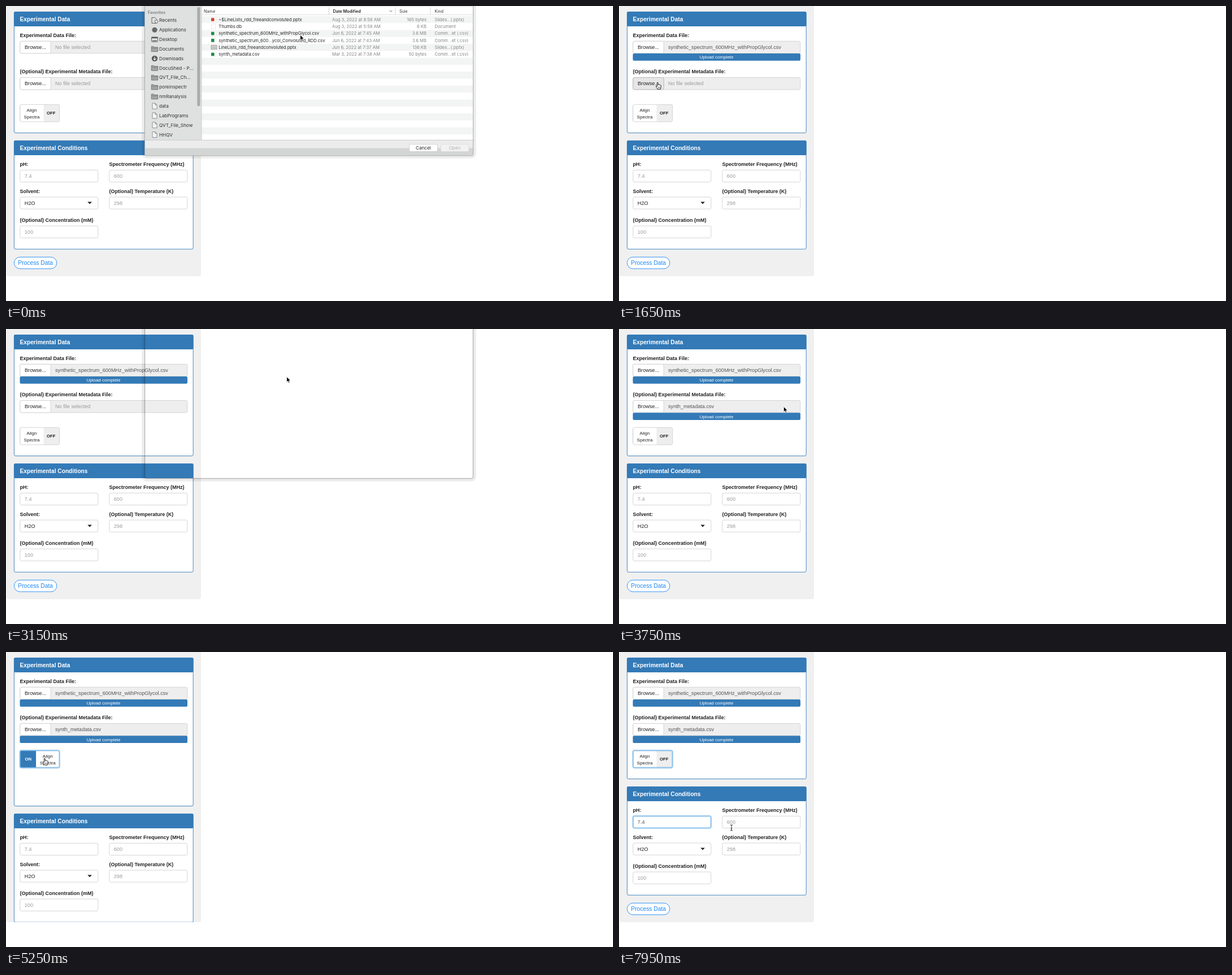
An HTML page that plays this animation: 1074 by 522 pixels, repeating every 8000 ms.

```html
<!DOCTYPE html>
<html lang="en">
<head>
<meta charset="utf-8">
<title>Experimental data form</title>
<style>
html, body { margin: 0; width: 100%; height: 100%; overflow: hidden; background: #fff; }
svg { display: block; width: 100vw; height: 100vh; }
text { font-family: "Liberation Sans", Arial, sans-serif; white-space: pre; }
.ui text { font-family: Inter, sans-serif; }
</style>
</head>
<body>
<svg id="stage" viewBox="0 0 1074 522"></svg>
<script>
const LOOP = 8000, STEP = 150;
const BLUE = '#337ab7', FOCUS = '#66afe9', INK = '#222';
const FILE_NAME = 'synthetic_spectrum_600MHz_withPropGlycol.csv';
const META_NAME = 'synth_metadata.csv';
const EXTRA_HEIGHT = 48;

// y is the middle of the capitals
const text = (x, y, str, size = 9.15, fill = INK, attrs = '') =>
  `<text x="${x}" y="${(y + size * 0.36).toFixed(2)}" font-size="${size}" fill="${fill}" ${attrs}>${str}</text>`;
const bold = (x, y, str, size = 9, fill = INK, attrs = '') =>
  text(x, y, str, size, fill, `font-weight="700" ${attrs}`);
const rect = (x, y, w, h, fill, attrs = '') =>
  `<rect x="${x}" y="${y}" width="${w}" height="${h}" fill="${fill}" ${attrs}/>`;
const path = (d, attrs) => `<path d="${d}" ${attrs}/>`;
const group = (id, body, attrs = '') => `<g id="${id}" ${attrs}>${body}</g>`;
const middle = 'text-anchor="middle"';

function header(y, title) {
  return rect(14, y, 317.5, 26, BLUE, 'rx="2"') + bold(24.5, y + 13, title, 10.2, '#fff');
}

function fileField(id, y, label) {
  return bold(24.5, y - 10.5, label) +
    rect(24.8, y + 0.3, 296, 21.4, '#eee', 'rx="2.5" stroke="#ccc" stroke-width=".8"') +
    group(id + 'Button', rect(24.8, y + 0.3, 54.4, 21.4, '#fff', 'rx="2.5" stroke="#ccc" stroke-width=".8"')) +
    text(33, y + 11, 'Browse...', 9.15, INK) +
    group(id + 'Empty', text(87, y + 11, 'No file selected', 9.15, '#999')) +
    group(id + 'Name', text(87, y + 11, id === 'data' ? FILE_NAME : META_NAME, 9.15, '#555')) +
    group(id + 'Bar', rect(24.5, y + 22, 296.5, 12.8, BLUE, 'rx="2"') +
      text(172.5, y + 28.6, 'Upload complete', 8, '#fff', middle));
}

function input(x, y, label, value, fill = '#999') {
  return bold(x, y - 10, label) +
    rect(x + 0.3, y + 0.3, 138, 21.2, '#fff', 'rx="2.5" stroke="#ccc" stroke-width=".8"') +
    (value && text(x + 8.3, y + 11, value, 9.15, fill));
}

const glow = (x, y, w, h) =>
  rect(x, y, w, h, 'none', `rx="2.5" stroke="${FOCUS}" stroke-width="4" stroke-opacity=".22"`) +
  rect(x, y, w, h, 'none', `rx="2.5" stroke="${FOCUS}" stroke-width="1"`);

function toggle() {
  const strip = rect(-3.3, 174, 28.3, 31, BLUE) + bold(10.9, 189.5, 'ON', 7.75, '#fff', middle) +
    rect(25, 174, 41.5, 31, '#fff') + rect(66.5, 174, 29, 31, '#eee') +
    text(45.5, 184, 'Align', 8.1, INK, middle) + text(45.5, 195.7, 'Spectra', 8.1, INK, middle) +
    bold(79.8, 189.6, 'OFF', 7.75, INK, middle);
  return `<g clip-path="url(#toggleClip)">${group('strip', strip)}</g>` +
    rect(24.8, 174.3, 69.8, 30.5, 'none', 'rx="2.5" stroke="#ccc" stroke-width=".8"') +
    group('toggleFocus', glow(24.8, 174.3, 69.8, 30.5));
}

function form() {
  const conditions = rect(14.4, 238.4, 316.8, 191.8, '#fff', `rx="2.5" stroke="${BLUE}" stroke-width=".9"`) +
    header(238, 'Experimental Conditions') +
    input(24.5, 290, 'pH:', '') + group('phFocus', glow(24.8, 290.3, 138, 21.2)) +
    '<text id="ph" x="32.8" y="304.3" font-size="9.15"></text>' +
    rect(33, 295.5, 0.7, 10.5, INK, 'id="caret"') +
    input(182.5, 290, 'Spectrometer Frequency (MHz)', '600') +
    input(24.5, 337.7, 'Solvent:', 'H2O', INK) + path('M144.3 346.4h7.6l-3.8 4z', `fill="${INK}"`) +
    input(182.5, 337.7, '(Optional) Temperature (K)', '298') +
    input(24.5, 388.8, '(Optional) Concentration (mM)', '100') +
    rect(14.4, 444.3, 75.4, 20.6, '#fff', 'rx="10.3" stroke="#1e88f5" stroke-width=".9"') +
    text(52.2, 454.7, 'Process Data', 10.3, '#1e88f5', middle);
  return rect(1.7, -6, 342.6, 483.6, '#f0f0f0', 'rx="2.5" stroke="#e8e8e8" stroke-width=".6"') +
    rect(14.4, 10.4, 316.8, 214.2, '#fff', `id="dataPanel" rx="2.5" stroke="${BLUE}" stroke-width=".9"`) +
    header(10, 'Experimental Data') +
    fileField('data', 62, 'Experimental Data File:') +
    fileField('meta', 126.2, '(Optional) Experimental Metadata File:') + toggle() +
    `<g clip-path="url(#formClip)">${group('conditions', conditions)}</g>`;
}

const icons = {
  folder: y => path(`M257.3 ${y - 4.3}h4l1.2 1.3h6.2v7.6h-11.4z`, 'fill="#a2a3a5" stroke="#66686a" stroke-width=".8"') +
    path(`M257.3 ${y - 1.3}h11.4`, 'stroke="#66686a" stroke-width=".6"'),
  page: y => path(`M259 ${y - 5}h5l3 3v7h-8zM264 ${y - 5}v3h3`, 'fill="#f4f4f4" stroke="#77797b" stroke-width=".8"'),
  recents: y => path(`M258 ${y - 5}h5.5l3 3v7h-8.5z`, 'fill="none" stroke="#55575a" stroke-width=".9"') +
    `<circle cx="266" cy="${y + 2}" r="2.8" fill="#e0e0e0" stroke="#55575a" stroke-width=".8"/>`,
  disc: y => `<circle cx="263" cy="${y}" r="4.6" fill="#66686a"/>`,
  desktop: y => rect(257.5, y - 4.2, 11, 8.4, 'none', 'rx="1" stroke="#55575a" stroke-width=".9"') +
    rect(257.5, y - 4.2, 11, 2.2, '#55575a') + rect(259, y + 1.6, 8, 1.4, '#55575a'),
  down: y => `<circle cx="263" cy="${y}" r="5.2" fill="#55575a"/>` +
    path(`M263 ${y - 3}v5.6m-2.3-2.3l2.3 2.4l2.3-2.4`, 'fill="none" stroke="#fff" stroke-width="1.1"')
};

const sidebar = [
  ['recents', 'Recents'], ['disc', 'Applications'], ['desktop', 'Desktop'], ['folder', 'Documents'],
  ['down', 'Downloads'], ['folder', 'DocuShed - P...'], ['folder', 'QVT_File_Ch...'], ['folder', 'poreinspectr'],
  ['folder', 'nmRanalysis'], ['page', 'data'], ['page', 'LabPrograms'], ['page', 'QVT_File_Show'], ['page', 'HHQV']
];
const SLIDES = 'Slides...(.pptx)', SHEET = 'Comm...et (.csv)';
const RED = '#d2402c', GREEN = '#1f8b4c';
const files = [
  [RED, '~$LineLists_rdd_freeandconvoluted.pptx', 'Aug 3, 2022 at 8:58 AM', '165 bytes', SLIDES],
  ['page', 'Thumbs.db', 'Aug 3, 2022 at 5:58 AM', '6 KB', 'Document'],
  [GREEN, FILE_NAME, 'Jun 6, 2022 at 7:45 AM', '3.6 MB', SHEET],
  [GREEN, 'synthetic_spectrum_600...ycol_Convoluted_RDD.csv', 'Jun 6, 2022 at 7:43 AM', '3.6 MB', SHEET],
  ['slide', 'LineLists_rdd_freeandconvoluted.pptx', 'Jun 6, 2022 at 7:37 AM', '136 KB', SLIDES],
  [GREEN, META_NAME, 'Mar 3, 2022 at 7:38 AM', '50 bytes', SHEET]
];
const rowY = i => 24 + 12.3 * i;

function fileIcon(kind, y) {
  if (kind === 'page') return rect(363.5, y - 4.5, 7, 9, '#fff', 'stroke="#ddd" stroke-width=".6"');
  if (kind === 'slide') return rect(363, y - 3.5, 10, 7, '#d5d5d5', 'stroke="#777" stroke-width=".6"') +
    path(`M364.5 ${y - 1}h7m-7 2h7`, 'stroke="#999" stroke-width=".6"');
  return rect(364.5, y - 4.3, 7, 8.6, '#fff', 'stroke="#ddd" stroke-width=".5"') +
    rect(363, y - 2.8, 5.6, 5.6, kind, 'rx=".6"');
}

function fileRow([kind, name, date, size, type], i, selected) {
  const y = rowY(i), ink = selected ? '#fff' : '#262626', grey = selected ? '#fff' : '#858585';
  return (selected ? rect(346, y - 6.15, 480.5, 12.3, '#0a60d6') : '') + fileIcon(kind, y) +
    text(376.3, y, name, 7.65, ink) + text(577, y, date, 7.65, grey) +
    text(744, y, size, 7.65, grey, 'text-anchor="end"') + text(758.5, y, type, 7.65, grey);
}

function dialog() {
  let body = rect(245.5, -4, 581, 269, '#ececec', 'rx="3"') +
    rect(245.5, 0, 100.5, 237, '#dfe0e0') + rect(346, 0, 480.5, 237, '#fff');
  for (let i = 0; i < 18; i += 2) body += rect(346, rowY(i) - 6.15, 480.5, Math.min(12.3, 243.15 - rowY(i)), '#f3f4f4');
  body += path('M245.5 .8H826.5M346 15.3H826.5', 'stroke="#d0d0d0" stroke-width=".7"') +
    path('M571.5 2.5V15M689 2.5V15M751 2.5V15M346 0V237M245.5 237.3H826.5', 'stroke="#c6c6c6" stroke-width=".8"') +
    text(350, 9, 'Name', 7.3, '#333') + text(578.5, 9, 'Date Modified', 7.3, '#222', 'font-weight="600"') +
    path('M678.7 7.8l2.3 2.4l2.3-2.4', 'fill="none" stroke="#555" stroke-width=".9"') +
    text(696, 9, 'Size', 7.3, '#333') + text(758.5, 9, 'Kind', 7.3, '#333') +
    text(251, 11, 'Favorites', 7, '#7b7d7f', 'font-weight="600"') +
    rect(338.3, 2, 5.2, 175, '#aaabab', 'rx="2.6"');
  sidebar.forEach(([icon, name], i) => {
    const y = 25.5 + 16.84 * i;
    body += icons[icon](y) + text(271, y, name, 8.2, '#303133');
  });
  files.forEach((file, i) => body += fileRow(file, i, false));
  body += group('pickData', fileRow(files[2], 2, true)) + group('pickMeta', fileRow(files[5], 5, true)) +
    rect(245.5, 251.5, 581, 13, '#d4d5d5', 'id="dialogShade"') +
    rect(713.5, 244.7, 50, 12.8, '#fff', 'rx="2.5" stroke="#c4c4c4" stroke-width=".7"') +
    text(738.3, 251, 'Cancel', 8.1, '#222', middle) +
    rect(769.3, 244.7, 49.5, 12.8, '#f2f2f2', 'rx="2.5" stroke="#d8d8d8" stroke-width=".7"') +
    text(794, 251, 'Open', 8.1, '#b4b4b4', middle) +
    rect(245.5, -4, 581, 268.7, 'none', 'rx="3" stroke="#aaa" stroke-width=".8"');
  return body;
}

const edge = (grow, width, opacity) =>
  rect(245.5 - grow, -12, 581 + 2 * grow, 276.5 + grow, 'none', `rx="${3 + grow}" stroke="#000" stroke-width="${width}" stroke-opacity="${opacity}"`);

const cursors = group('arrow', path('M0 0V9.6L2.2 7.6L3.7 11L5.4 10.2L3.9 7H6.9Z', 'fill="#000" stroke="#fff" stroke-width=".8"')) +
  group('hand', path('M-.9 .6C-.9-.5 1-.5 1 .6V4.2L1.3 3.6C2 3.2 2.6 3.5 2.7 4.1C3.4 3.6 4.2 3.9 4.4 4.6C5.2 4.3 6 4.6 6 5.5C6.1 8 5.6 9 5 11.6H-.2C-.6 10-2.2 8.3-2.9 7C-3.2 6-2 5.7-1.4 6.4L-.9 7Z',
    'fill="#fff" stroke="#000" stroke-width=".9"') + path('M1.2 7.2v2.6M2.6 7.2v2.6M4 7.2v2.6', 'stroke="#000" stroke-width=".5"')) +
  group('beam', path('M-2-5.2Q0-5.2 0-4Q0-5.2 2-5.2M0-4V4M-2 5.2Q0 5.2 0 4Q0 5.2 2 5.2M-1 1.8H1', 'fill="none" stroke="#222" stroke-width="1"'));

document.getElementById('stage').innerHTML =
  '<defs><clipPath id="toggleClip">' + rect(24.8, 174.3, 69.8, 30.5, '#000', 'rx="2.5"') + '</clipPath>' +
  '<clipPath id="formClip">' + rect(0, 0, 345, 478, '#000') + '</clipPath>' +
  '<filter id="blur" x="-5%" y="-5%" width="110%" height="112%"><feGaussianBlur stdDeviation="2.2"/></filter></defs>' +
  form() +
  group('softShadow', rect(245.5, -10, 581, 276, '#000', 'fill-opacity=".28" filter="url(#blur)"')) +
  group('wideShadow', edge(2.5, 5.5, 0.07) + edge(0, 3, 0.06) + edge(0, 1, 0.2)) +
  group('dialog', dialog(), 'class="ui"') + cursors;

const byId = id => document.getElementById(id);
const show = (id, on) => byId(id).setAttribute('display', on ? 'inline' : 'none');
const move = (id, x, y) => byId(id).setAttribute('transform', `translate(${x} ${y})`);
const between = (t, a, b) => t >= a && t < b;
const ramp = (t, a, b) => {
  const p = Math.min(1, Math.max(0, (t - a) / (b - a)));
  return p * p * (3 - 2 * p);
};

// time, x, y, pointer shape from that time on
const pointer = [
  [0, 520.5, 51, 'arrow'], [300, 519, 48, 'arrow'], [900, 519, 48, 'arrow'], [1500, 80, 133, 'arrow'],
  [1650, 68.3, 135.5, 'hand'], [1950, 68.3, 135.5, 'arrow'], [2400, 404.7, 130, 'arrow'],
  [2850, 496.7, 84.5, 'arrow'], [3300, 496.7, 84.5, 'arrow'], [4200, 86, 190, 'hand'],
  [4350, 76.7, 193, 'hand'], [4800, 68.3, 188, 'hand'], [6450, 68.3, 190, 'arrow'],
  [6750, 54, 318, 'arrow'], [6900, 52, 303, 'beam'], [7200, 52, 303, 'none'],
  [7650, 52, 303, 'none'], [7800, 150, 310, 'beam'], [7950, 199, 311, 'beam'], [LOOP, 199, 311, 'beam']
];

function drawPointer(t) {
  const i = pointer.findIndex((p, n) => n < pointer.length - 1 && t < pointer[n + 1][0]);
  const [t0, x0, y0, shape] = pointer[i], [t1, x1, y1] = pointer[i + 1];
  const p = ramp(t, t0, t1);
  for (const id of ['arrow', 'hand', 'beam']) show(id, id === shape);
  if (shape !== 'none') move(shape, x0 + (x1 - x0) * p, y0 + (y1 - y0) * p);
}

function draw(time) {
  const t = Math.floor(time / STEP) * STEP;
  const open = t < 750 || between(t, 2100, 3150);
  const opening = t < 150 || between(t, 2100, 2250);
  show('dialog', open);
  show('softShadow', open && !opening);
  show('wideShadow', opening || between(t, 750, 900) || between(t, 1950, 2100) || between(t, 3150, 3300));
  show('dialogShade', opening);
  show('pickData', between(t, 300, 750));
  show('pickMeta', between(t, 2850, 3150));

  for (const [id, loaded] of [['data', 1050], ['meta', 3600]]) {
    show(id + 'Empty', t < loaded);
    show(id + 'Name', t >= loaded);
    show(id + 'Bar', t >= loaded);
  }
  const hover = between(t, 1650, 1950);
  const button = byId('metaButton').firstChild;
  button.setAttribute('fill', hover ? '#e6e6e6' : '#fff');
  button.setAttribute('stroke', hover ? '#adadad' : '#ccc');

  move('strip', 28.3 * (ramp(t, 4500, 4950) - ramp(t, 5700, 6190)), 0);
  show('toggleFocus', t >= 4650);
  const extra = between(t, 4800, 5850) ? EXTRA_HEIGHT : 0;
  byId('dataPanel').setAttribute('height', 214.2 + extra);
  move('conditions', 0, extra);

  const typed = t < 7350 ? '' : '7.4'.slice(0, Math.round((t - 7350) / STEP) + 1);
  byId('ph').textContent = typed || '7.4';
  byId('ph').setAttribute('fill', typed ? '#555' : '#999');
  show('phFocus', t >= 7050);
  show('caret', between(t, 7050, 7800));
  byId('caret').setAttribute('x', 33 + [0, 5.1, 7.6, 12.7][typed.length]);
  drawPointer(t);
}

const start = performance.now();
function tick() {
  draw((performance.now() - start) % LOOP);
  requestAnimationFrame(tick);
}
tick();
</script>
</body>
</html>
```
